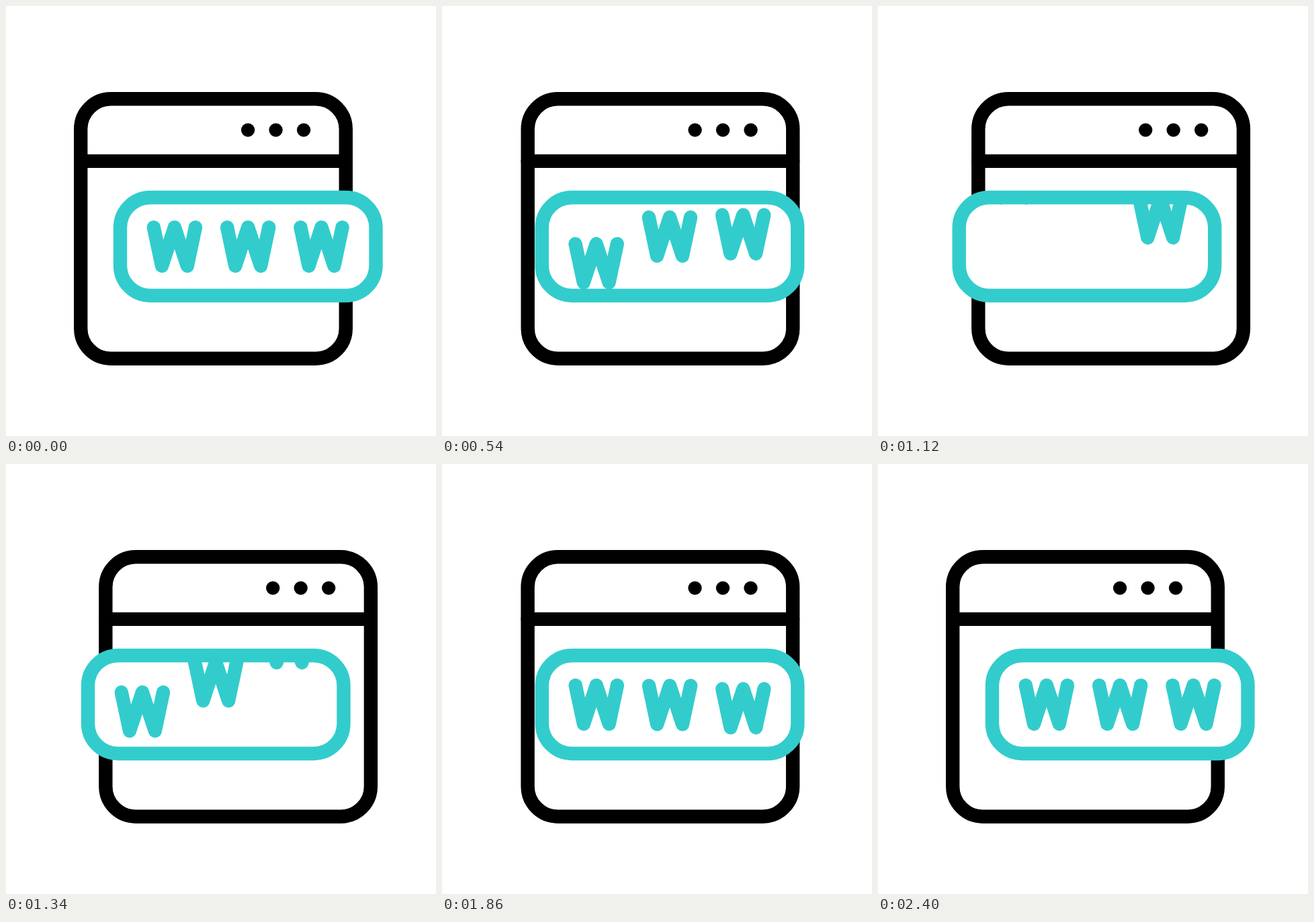
Animation of 640 by 640 pixels, one loop 2.42 s. Source, as an HTML page:

```html
<!DOCTYPE html>
<html lang="en">
<head>
<meta charset="utf-8">
<title>Browser window</title>
<style>
  html, body { margin: 0; width: 100%; height: 100%; overflow: hidden; background: #fff; }
  svg { display: block; width: 100vw; height: 100vh; }
  .line { stroke-width: 20.4; stroke-linecap: round; stroke-linejoin: round; fill: none; }
</style>
</head>
<body>
<svg viewBox="0 0 640 640">
  <defs>
    <clipPath id="inside"><rect x="170" y="285" width="380.5" height="146" rx="44.8"/></clipPath>
    <path id="w" d="M219.8 329.4L232 386.8L250.9 329.4L269.8 386.8L282 329.4"/>
  </defs>
  <g id="window" class="line" stroke="#000">
    <rect x="111.2" y="138.3" width="394.6" height="386.4" rx="44.8"/>
    <path d="M111.2 230.9H505.8"/>
    <g fill="#000" stroke="none">
      <circle cx="360.1" cy="184.6" r="10.2"/>
      <circle cx="401.6" cy="184.6" r="10.2"/>
      <circle cx="443.1" cy="184.6" r="10.2"/>
    </g>
  </g>
  <g id="bar" class="line" stroke="#33cccc">
    <rect x="170" y="285" width="380.5" height="146" rx="44.8" fill="#fff"/>
    <g clip-path="url(#inside)">
      <use class="letter" href="#w"/>
      <use class="letter" href="#w"/>
      <use class="letter" href="#w"/>
    </g>
  </g>
</svg>
<script>
const LOOP = 2420, STAGGER = 100, SPACING = 109.3;
const SWAY = [[0, 0], [1200, 1], [2400, 0]];
// Rise a little, drop out below, return from above, overshoot, settle.
const HOP = [[0, 0], [400, -19.5], [800, 135.5], [1000, -135.5], [1400, 19.5], [1800, 0]];

const windowGroup = document.getElementById("window");
const bar = document.getElementById("bar");
const letters = document.querySelectorAll(".letter");

const move = (el, x, y) => el.setAttribute("transform", `translate(${x} ${y})`);

// Smoothstep between neighbouring keys, held outside them.
function sample(keys, t) {
  if (t <= keys[0][0]) return keys[0][1];
  const next = keys.findIndex(key => key[0] > t);
  if (next < 0) return keys[keys.length - 1][1];
  const [t0, a] = keys[next - 1], [t1, b] = keys[next];
  const u = (t - t0) / (t1 - t0);
  return a + (b - a) * u * u * (3 - 2 * u);
}

function draw() {
  const t = performance.now() % LOOP;
  const sway = sample(SWAY, t);
  move(windowGroup, 38.6 * sway, 0);
  move(bar, -49.9 * sway, 0);
  letters.forEach((letter, i) => move(letter, i * SPACING, sample(HOP, t - i * STAGGER)));
  requestAnimationFrame(draw);
}
draw();
</script>
</body>
</html>
```
